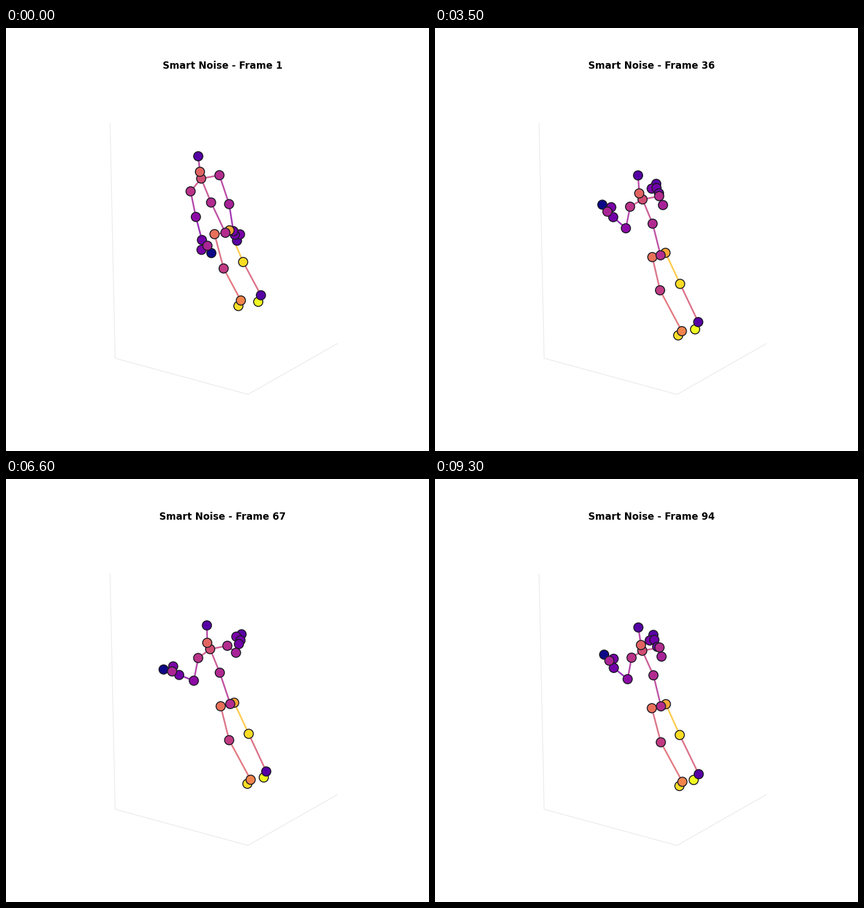
These frames come from a looping animation (748 px wide and 748 px high, 9.4 s). A matplotlib script:

```python
import matplotlib.pyplot as plt
import numpy as np
from matplotlib.animation import FuncAnimation
from matplotlib.collections import LineCollection

SIZE, DPI = 748, 100
FRAMES, INTERVAL = 94, 100
frame = np.arange(FRAMES)


def ease(u):
    return 0.5 - 0.5 * np.cos(np.pi * np.clip(u, 0, 1))


def eased_track(keys):
    """Run through (frame, value) keys, easing in and out of each."""
    track = np.full(FRAMES, float(keys[0][1]))
    for (t0, v0), (t1, v1) in zip(keys, keys[1:]):
        track += (v1 - v0) * ease((frame - t0) / (t1 - t0))
    return track


# the arms lift once, then open and close
lift = ease((frame - 10) / 9)
spread = eased_track([(18, .9), (33, 0), (46, 1), (59, 0), (72, .65), (88, 0)])
weights = np.stack([1 - lift, lift * (1 - spread), lift * spread], axis=1)


def blend(*states):
    """Mix the hanging, closed and open states; one state stays fixed."""
    return weights @ np.broadcast_to(np.array(states, float), (3, 2))


def swing(angles, length, turn=0):
    """A hand part of fixed length, turning with the arm (degrees)."""
    a = np.radians(weights @ np.array(angles, float) + turn)
    return length * np.stack([np.cos(a), np.sin(a)], axis=1)


HAND_R = (70, -110, -15)
HAND_L = (55, 235, 145)

# joint: (parent, colormap value, offset from parent), from back to front
JOINTS = {
    "tip_r": ("hand_r", .16, swing(HAND_R, 10)),
    "thumb_r": ("hand_r", .24, swing(HAND_R, 9, -75)),
    "hand_r": ("wrist_r", .21, swing(HAND_R, 9)),
    "wrist_r": ("elbow_r", .22, blend((7, 46), (-8, -21), (30, -5))),
    "elbow_r": ("shoulder_r", .37, blend((18, 52), (2, 17), (38, 7))),
    "shoulder_r": ("chest", .41, blend((31, -7))),
    "foot_r": ("ankle_r", 1.0, blend((-6, 12))),
    "foot_l": ("ankle_l", .94, blend((-6, 8))),
    "ankle_r": ("knee_r", .15, blend((31, 59), (31, 67), (30, 66))),
    "ankle_l": ("knee_l", .70, blend((31, 58), (39, 71), (37, 66))),
    "knee_r": ("hip_r", .93, blend((26, 56))),
    "knee_l": ("hip_l", .46, blend((15, 60))),
    "hip_r": ("base", .80, blend((7, -4))),
    "hip_l": ("base", .64, blend((-17, 3))),
    "base": (None, .41, blend((388, 362), (401, 402), (389, 393))),
    "mid": ("base", .40, blend((-24, -53), (-16, -56), (-21, -54))),
    "chest": ("mid", .52, blend((-18, -42))),
    "neck": ("chest", .60, blend((-4, -12))),
    "head": ("neck", .15, blend((-2, -29))),
    "wrist_l": ("elbow_l", .22, blend((12, 41), (-25, -20), (-32, 9))),
    "tip_l": ("hand_l", 0.0, swing(HAND_L, 14)),
    "thumb_l": ("hand_l", .24, swing(HAND_L, 10, 90)),
    "hand_l": ("wrist_l", .38, swing(HAND_L, 14)),
    "elbow_l": ("shoulder_l", .29, blend((8, 47), (-6, 36), (-13, 45))),
    "shoulder_l": ("chest", .43, blend((-19, 20), (-20, 13), (-20, 19))),
}


def place(name):
    parent, _, offset = JOINTS[name]
    return offset + place(parent) if parent else offset


names = list(JOINTS)
motion = np.stack([place(n) for n in names], axis=1)
motion += np.random.default_rng(7).normal(0, 0.9, motion.shape)

values = np.array([v for _, v, _ in JOINTS.values()])
links = np.array([(names.index(JOINTS[n][0]), k)
                  for k, n in enumerate(names) if JOINTS[n][0]])
plasma = plt.get_cmap("plasma")

fig = plt.figure(figsize=(SIZE / DPI, SIZE / DPI), dpi=DPI, facecolor="white")
ax = fig.add_axes([0, 0, 1, 1])
ax.set_xlim(0, SIZE)
ax.set_ylim(SIZE, 0)
ax.axis("off")

ax.plot([184, 193, 428, 586], [168.5, 584, 648, 558], color="#e6e6e6", lw=0.8)
title = ax.text(383.2, 72.2, "", fontsize=12.2, weight="bold", ha="center",
                va="baseline", family="DejaVu Sans")
bones = LineCollection([], colors=plasma(values[links].mean(axis=1)),
                       linewidths=2.1, alpha=0.8, zorder=3)
ax.add_collection(bones)
dots = ax.scatter(*motion[0].T, s=138, c=plasma(values), edgecolors="#1a1a24",
                  linewidths=1.2, zorder=4)


def update(i):
    bones.set_segments(motion[i][links])
    dots.set_offsets(motion[i])
    title.set_text(f"Smart Noise - Frame {i + 1}")
    return bones, dots, title


anim = FuncAnimation(fig, update, frames=FRAMES, interval=INTERVAL,
                     repeat=True, repeat_delay=0)
plt.show()
```
